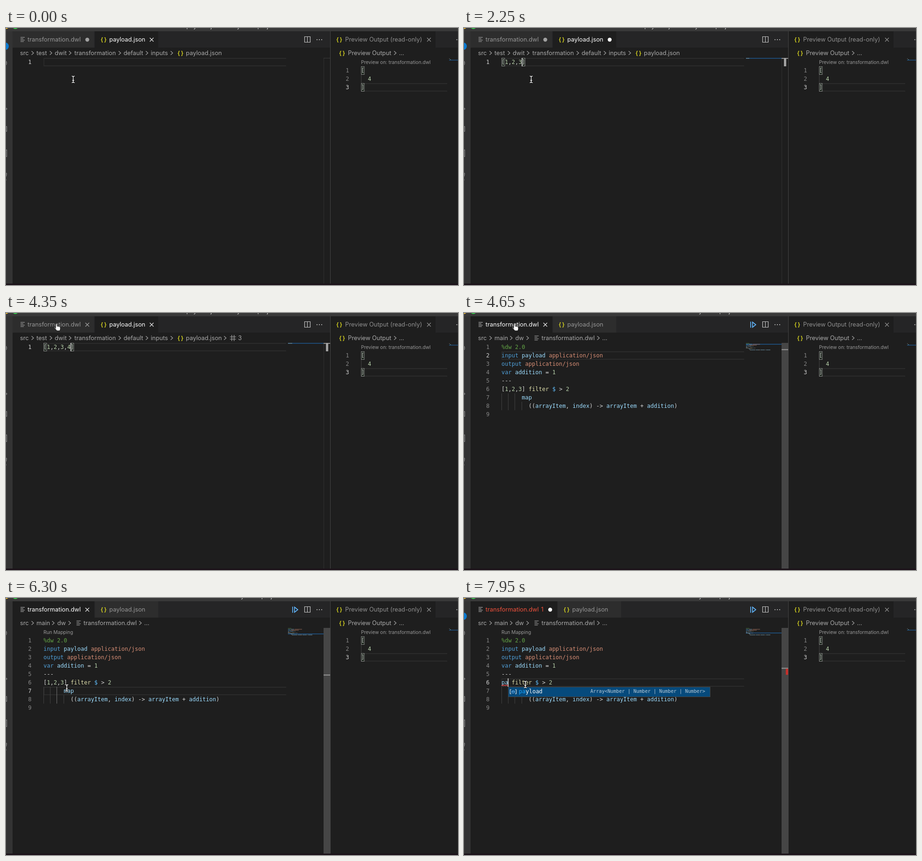
Write an HTML page that moves like this. It is 965 px wide and 550 px high and loops after 8000 ms.

```html
<!DOCTYPE html>
<html lang="en">
<head>
<meta charset="utf-8">
<style>
  html, body { margin: 0; width: 100%; height: 100%; overflow: hidden; background: #1e1e1e; }
  svg { display: block; }
  text { white-space: pre; }
  .ui { font: 12.8px Inter, "Open Sans", sans-serif; }
  .lens { font: 10.15px Inter, "Open Sans", sans-serif; }
  .mono { font: 12px "DejaVu Sans Mono", monospace; }
  .detail { font: 10.2px "DejaVu Sans Mono", monospace; }
  .brace { font: 600 12px Inter, sans-serif; letter-spacing: 2px; }
</style>
</head>
<body>
<svg id="stage" width="965" height="550" viewBox="0 0 965 550"></svg>
<script>
const LOOP = 8000, TICK = 150, CHAR = 7.224, LEFT = 80;
const C = {
  plain: '#d4d4d4', num: '#b5cea8', key: '#4f9fd8', str: '#d98f76', name: '#9cdcfe',
  green: '#62a345', fn: '#dcdcaa', dollar: '#62c0ff', grey: '#a9a9a9', dim: '#858585',
  tab: '#969696', yellow: '#d6d31f', box: '#888888'
};
const stage = document.getElementById('stage');

const esc = s => s.replace(/&/g, '&amp;').replace(/</g, '&lt;');
const text = (x, y, s, fill, cls = 'ui', extra = '') =>
  `<text class="${cls}" x="${x}" y="${y}" fill="${fill}" ${extra}>${esc(s)}</text>`;
const rect = (x, y, w, h, fill, extra = '') =>
  `<rect x="${x}" y="${y}" width="${w}" height="${h}" fill="${fill}" ${extra}/>`;
const line = (d, stroke, w = 1, fill = 'none') =>
  `<path d="${d}" stroke="${stroke}" stroke-width="${w}" fill="${fill}"/>`;
const circle = (x, y, r, fill) => `<circle cx="${x}" cy="${y}" r="${r}" fill="${fill}"/>`;
const cross = (x, col) => line(`M${x - 4} 21l8 8m0-8l-8 8`, col, 1.2);
const dot = (x, col) => circle(x, 25, 4.2, col);
const chevron = x => line(`M${x - 2.5} 49.5l4.5 4-4.5 4`, C.grey, 1.1);
const braces = (x, y) => text(x, y, '{}', C.yellow, 'brace');
const fileIcon = (x, y, col) => line(`M${x} ${y - 4}h9m-9 3h6m-6 3h9m-9 3h7`, col, 1.2);
const more = x => [0, 5, 10].map(d => circle(x + d, 25, 1.1, '#c5c5c5')).join('');
const col = n => LEFT + n * CHAR;

// A line of code is a list of [text, colour] pairs.
const mono = (x, top, tokens) => `<text class="mono" x="${x}" y="${top + 13}">` +
  tokens.map(([s, fill]) => `<tspan fill="${fill}">${esc(s)}</tspan>`).join('') + '</text>';
const list = s => s.split(/(\d)/).filter(Boolean)
  .map(p => [p, /\d/.test(p) ? C.num : C.plain]);
const lineNo = (right, top, n, current) =>
  text(right, top + 13, String(n), n === current ? '#d0d0d0' : C.dim, 'mono', 'text-anchor="end"');
const lineFrame = (x, top, right) =>
  line(`M${right} ${top + 1}H${x + 1}V${top + 17}H${right}`, '#303030', 1.3);
const bracketBox = (x, top) =>
  rect(x + .5, top + .5, 6.4, 17, '#00640018', `stroke="${C.box}"`);
const caret = (x, top) => rect(x, top, 1.6, 18, '#d8d8d8');

const RULES = [['filter ', C.fn], ['$', C.dollar], [' > ', C.plain], ['2', C.num]];
const codeLines = head => [
  [['%dw 2.0', C.green]],
  [['input ', C.key], ['payload ', C.name], ['application/json', C.str]],
  [['output ', C.key], ['application/json', C.str]],
  [['var ', C.key], ['addition', C.name], [' = ', C.plain], ['1', C.num]],
  [['---', C.plain]],
  [...head, [' ', C.plain], ...RULES],
  [['      ', C.plain], ['map', C.name]],
  [['        ((', C.plain], ['arrayItem', C.name], [', ', C.plain], ['index', C.name],
   [') -> ', C.plain], ['arrayItem', C.name], [' + ', C.plain], ['addition', C.name], [')', C.plain]],
  []
];

function minimap(lines, current) {
  let out = rect(602, 64 + 2 * (current - 1), 76, 1.6, '#1f5486');
  lines.forEach((tokens, i) => {
    let x = 602;
    for (const [s, fill] of tokens) {
      const lead = s.length - s.trimStart().length, w = s.trim().length;
      if (w) out += rect(x + lead, 64.4 + 2 * i, w, 1.1, fill, 'opacity=".55"');
      x += s.length;
    }
  });
  return out;
}

function chrome() {
  const icons = line('M0 71q3 4 0 8M0 171l2 2-2 2M-2 211h3.5v10h-3.5M-2 261h3.5v14h-3.5M0 310l1.5 2-1.5 6M0 325h1', C.dim, 1.3);
  return rect(0, 0, 965, 550, '#1e1e1e') + rect(0, 0, 965, 7, '#393939') +
    circle(0, -4, 6, '#f5bf2f') + circle(20, -4, 6.2, '#35c748') +
    rect(0, 7, 14, 543, '#333333') + icons + rect(14, 7, 951, 35, '#252526');
}

function previewPane() {
  return rect(693, 7, 224, 35, '#1e1e1e') +
    braces(705, 29) + text(724, 29, 'Preview Output (read-only)', '#8f8f8f', 'ui', 'font-style="italic"') +
    cross(903, '#8f8f8f') + circle(962.5, 25, 1.1, '#c5c5c5') +
    braces(711, 58) + text(730, 58, 'Preview Output', C.grey) + chevron(831) + text(839, 58, '…', C.grey) +
    text(758, 77, 'Preview on: transformation.dwl', '#999999', 'lens') +
    [1, 2, 3].map(n => lineNo(732.5, 64 + 18 * n, n, 3)).join('') +
    lineFrame(758, 118, 942) + rect(758, 100, 1, 18, '#404040') +
    bracketBox(758, 82) + bracketBox(758, 118) +
    mono(758, 82, [['[', C.plain]]) + mono(758, 100, [['  4', C.num]]) + mono(758, 118, [[']', C.plain]]) +
    rect(946, 68, 19, 1.4, '#1f5486') + rect(946, 65, 1.5, 1, '#777') + rect(948, 67, 1.5, 1, '#8a9') +
    rect(692, 7, 1, 543, '#444444') + rect(0, 547, 965, 3, '#1b1118');
}

function actions() {
  return line('M637.5 18.5h12v12h-12zM643.5 18.5v12', '#c5c5c5', 1.2) + more(664);
}

function title(s, mid) {
  return text(mid, -.5, s + ' — my-dwit-project', '#cccccc', 'ui', 'text-anchor="middle"');
}

// The JSON input being typed.
function payloadEditor(t) {
  const typed = '1,2,3,4';
  const count = t < 1350 ? 0 : t < 1800 ? 1
    : t >= 2400 ? 7 : 2 + Math.floor((t - 1800) / TICK);
  const open = t >= 750, dirty = open && t < 3300, saved = t >= 3450;
  const value = open ? `[${typed.slice(0, count)}]` : '';
  const caretOn = t >= 300 && !(t >= 2850 && t < 3450) && !(t >= 3900 && t < 4350);

  let out = title('payload.json', 482) + (saved ? '' : circle(-2, 39, 8, '#0a7ad1')) +
    rect(14, 7, 174.5, 35, '#2d2d2d') + rect(189.5, 7, 135.5, 35, '#1e1e1e') +
    fileIcon(31, 24, '#b0b0b0') + text(46, 29, 'transformation.dwl', C.tab) +
    (saved ? cross(173.5, '#a0a0a0') : dot(173.5, '#a0a0a0')) +
    braces(202, 29) + text(220.5, 29, 'payload.json', '#ffffff', 'ui', open ? '' : 'font-style="italic"') +
    (dirty ? dot(311, '#ffffff') : cross(311, '#e8e8e8'));

  const path = [[30, 'src'], [65, 'test'], [104, 'dwit'], [146, 'transformation'], [251, 'default'], [309, 'inputs']];
  out += path.map(([x, s]) => text(x, 58, s, C.grey)).join('') +
    [57, 96, 137, 243, 301, 354].map(chevron).join('') +
    braces(366, 58) + text(384, 58, 'payload.json', C.grey);
  if (t >= 2700) {
    out += chevron(468) + line('M478 51h13m-13 5h13M482 47v13m5-13v13', C.grey, 1.2) +
      text(495.5, 58, '3', C.grey);
  }

  out += rect(678, 64, 1, 486, '#303030') + rect(678, 64, 14, 1, '#3a3a3a') +
    lineNo(54.5, 64, 1, 1) + lineFrame(LEFT, 64, 598);
  if (open) {
    out += bracketBox(LEFT, 64) + bracketBox(col(count + 1), 64) + mono(LEFT, 64, list(value)) +
      rect(678, 64, 14, 2, '#8c8c8c') + rect(683, 64, 5, 18, '#a0a0a0');
    if (t >= 1050) out += minimap([list(value)], 1);
  }
  return out + (caretOn ? caret(col(open ? count + 1 : 0), 64) : '');
}

function suggestion(top) {
  return rect(94.5, top + .5, 431, 21, '#064a7c', 'stroke="#454545"') +
    line('M101 196h-2.500v9h2.500M109 196h2.500v9h-2.500', '#e0e0e0', 1.2) +
    line('M102 199.500l3.500-1.500 2.500 1.500v3l-3.500 1.500-2.500-1.500zM102 199.500l2.500 1.500 3.500-1.500', '#75beff', 1) +
    mono(117, 191, [['pa', '#18a3ff'], ['yload', '#ffffff']]) +
    text(515, 203, 'Array<Number | Number | Number | Number>', '#b9cbd8', 'detail', 'text-anchor="end"');
}

// The script that reads the input.
function scriptEditor(t) {
  const lenses = t < 4950 ? 0 : t < 5850 ? 2 : 1;
  const top = n => 64 + 18 * (n - 1) + (lenses ? 18 : 0) + (lenses === 2 && n > 1 ? 18 : 0);
  const current = t < 5700 ? 2 : t >= 6300 && t < 6750 ? 7 : 6;
  const selected = t >= 7050 && t < 7800, typing = t >= 7800, error = t >= 7950;
  const matched = current === 6 && t < 7050;
  const word = error ? 'pa' : 'p', shift = error ? 10.5 : 0;
  const lines = codeLines(typing ? [[word, C.name]] : list('[1,2,3]'));
  const y = top(current), ruler = 64 + .8 * (y - 64);
  const red = '#f0513c';

  let out = title('transformation.dwl', 472) + (typing ? circle(-2, 39, 8, '#0a7ad1') : '') +
    rect(14, 7, 174.5 + shift, 35, '#1e1e1e') + rect(189.5 + shift, 7, 135.5, 35, '#2d2d2d') +
    fileIcon(31, 24, '#c5c5c5') + text(46, 29, 'transformation.dwl', error ? red : '#ffffff') +
    (error ? text(164.5, 28.5, '1', red, 'ui', 'font-size="11"') : '') +
    (typing ? dot(173.5 + shift, '#ffffff') : cross(173.5, '#e8e8e8')) +
    braces(202 + shift, 29) + text(220.5 + shift, 29, 'payload.json', C.tab) +
    line('M612 18.500v13M616 19.500l7 5.500-7 5.500z', '#62b8ff', 1.6);

  out += [[30, 'src'], [65, 'main'], [109.5, 'dw'], [165.5, 'transformation.dwl'], [295, '…']]
    .map(([x, s]) => text(x, 58, s, C.grey)).join('') +
    [57, 101, 136, 287].map(chevron).join('') + fileIcon(150.5, 53, C.grey);

  if (lenses) out += text(LEFT, 77, 'Run Mapping', '#999999', 'lens');
  if (lenses === 2) out += text(LEFT, 113, 'Define Sample Data', '#999999', 'lens');

  out += rect(678, 64, 14, 486, '#464646') + rect(678, ruler - 1, 14, 2, '#969696');
  if (matched) out += rect(683, ruler, 5, 14, '#a0a0a0');
  if (error) out += rect(687, ruler + 1, 5, 13, '#c4302b');

  if (selected) out += rect(LEFT, y, 7 * CHAR, 18, '#17508a');
  else out += lineFrame(LEFT, y, 598);
  for (const [n, guides] of [[7, 3], [8, 4]]) {
    for (let g = 0; g < guides; g++) {
      out += rect(Math.floor(col(2 * g)), top(n), 1, 18, current === 7 && g === 2 ? '#707070' : '#404040');
    }
  }
  if (matched) out += bracketBox(col(0), y) + bracketBox(col(6), y);
  lines.forEach((tokens, i) => {
    out += lineNo(54.5, top(i + 1), i + 1, current) + mono(LEFT, top(i + 1), tokens);
  });
  out += minimap(lines, current);

  if (selected) out += caret(LEFT, y);
  if (matched) out += caret(col(7), y);
  if (typing) out += caret(col(word.length) - 1, y);
  if (error) {
    out += line(`M80 ${y + 16}` + 'l2-2 2 2'.repeat(3) + 'l2-2', '#f14c4c', 1.1) + suggestion(190);
  }
  return out;
}

// Pointer stops: time, x, y.
const STOPS = [[0, 143.5, 110], [3450, 143.5, 110], [4050, 109, 30], [4800, 109, 30],
  [5550, 128.5, 200], [6000, 128.5, 200], [6600, 131, 185], [LOOP, 131, 185]];

function pointer(t) {
  const i = STOPS.findIndex((s, k) => k && t <= s[0]);
  const [a, b] = [STOPS[i - 1], STOPS[i]];
  const p = (t - a[0]) / (b[0] - a[0]), e = p * p * (3 - 2 * p);
  const x = a[1] + (b[1] - a[1]) * e, y = a[2] + (b[2] - a[2]) * e;
  const hand = 'M-3 3V-5.500q0-1.500 1.500-1.500t1.500 1.500v4q2-1 2.500.5 2-1 2.500.5 2-.5 2 1.500v3q0 2-1.500 4h-6q-1-2-5.500-6.500 0-2 3 .5z';
  const beam = 'M-3-7q3 0 3 2 0-2 3-2M0-5V5M-3 7q3 0 3-2 0 2 3 2M-2 2h4';
  const shape = y < 42 ? line(hand, '#111111', .9, '#ffffff')
    : line(beam, '#000000', 3) + line(beam, '#ffffff', 1.4);
  return `<g transform="translate(${x} ${y})">${shape}</g>`;
}

let shown = -1;
function draw(now) {
  const t = Math.floor((now % LOOP) / TICK) * TICK;
  if (t !== shown) {
    shown = t;
    stage.innerHTML = chrome() + (t < 4650 ? payloadEditor(t) : scriptEditor(t)) +
      actions() + previewPane() + pointer(t);
  }
  requestAnimationFrame(draw);
}
const start = performance.now();
draw(0);
requestAnimationFrame(function first() {
  shown = -1;
});
</script>
</body>
</html>
```
